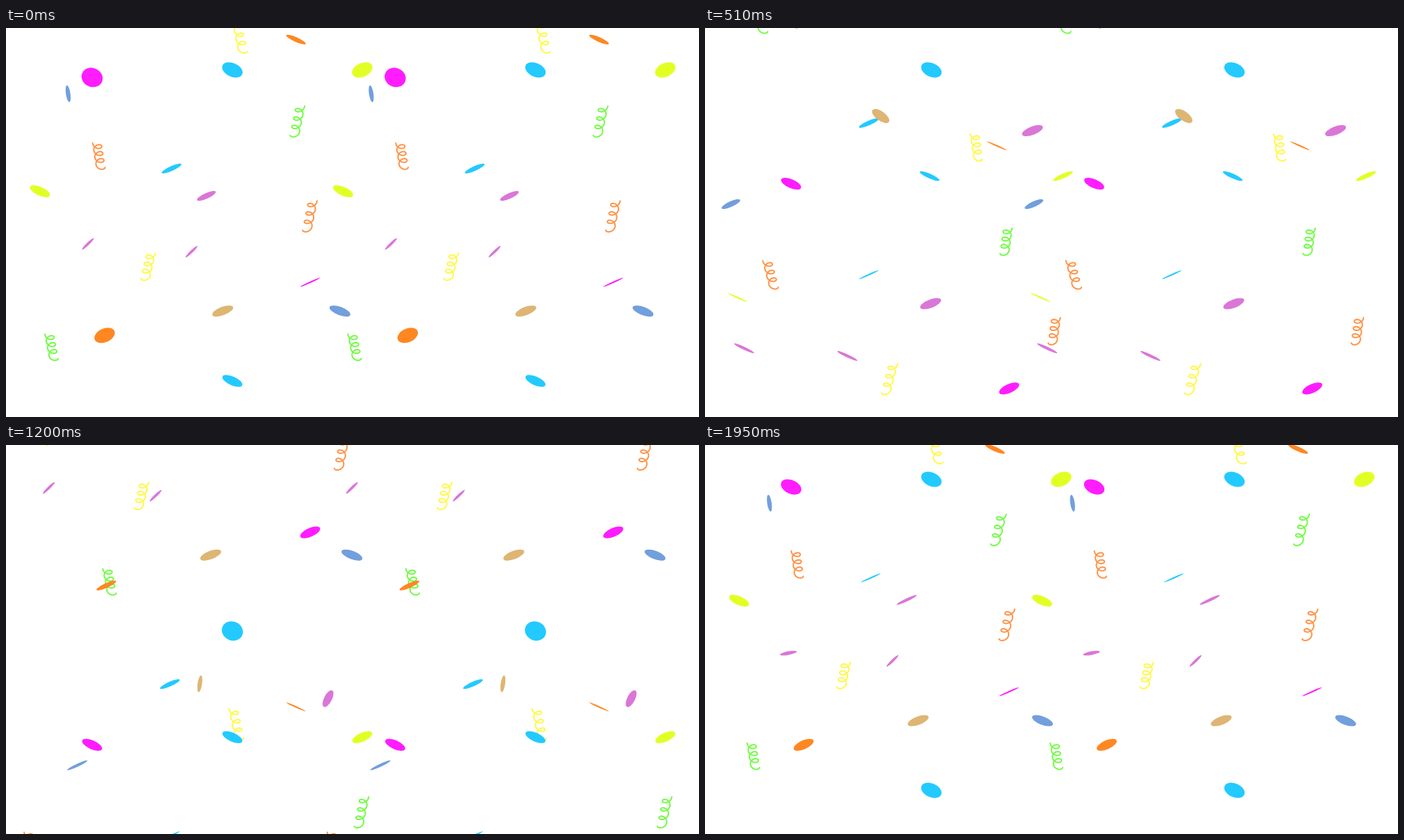
An HTML page with a canvas that plays this animation: 998x561 px, repeating every 1.98 s.

```html
<!DOCTYPE html>
<html lang="en">
<head>
<meta charset="utf-8">
<title>Confetti</title>
<style>
html, body { margin: 0; width: 100%; height: 100%; overflow: hidden; background: #fff; }
canvas { display: block; }
</style>
</head>
<body>
<canvas id="stage" width="998" height="561"></canvas>
<script>
const ctx = document.getElementById('stage').getContext('2d');
const LOOP = 1980, TICK = 30, STEP = 36, STEPS = 55, TILE = 436.5;

const MAGENTA = '#ff1cff', CYAN = '#22caff', LEMON = '#e2ff24', ORANGE = '#ff8722';
const BLUE = '#729fdd', TAN = '#deb573', PLUM = '#da76d8';
const COIL_YELLOW = '#fff84a', COIL_GREEN = '#74fb48', COIL_ORANGE = '#ff9448';

// lane x, age at the start, colour, direction (-1 = mirrored)
const coils = [
  [342, 0, COIL_YELLOW, -1], [463, 11, COIL_GREEN, 1], [84, 15, COIL_ORANGE, -1],
  [478, 22, COIL_ORANGE, 1], [220, 28, COIL_YELLOW, 1], [99, 38, COIL_GREEN, -1]
];
const discs = [
  [124, 6, MAGENTA, 1], [438, 33, MAGENTA, -1], [326, 5, CYAN, 1], [236, 18, CYAN, -1],
  [326, 46, CYAN, 1], [236, 53, CYAN, -1], [513, 5, LEMON, -1], [49, 21, LEMON, 1],
  [142, 40, ORANGE, -1], [420, 1, ORANGE, 1]
];
const flakes = [
  [75, 8, BLUE, -1], [486, 36, BLUE, 1], [307, 36, TAN, -1], [255, 52, TAN, 1],
  [325, 21, PLUM, -1], [84, 27, PLUM, 1], [236, 28, PLUM, 1], [479, 54, PLUM, -1]
];

const mod = (n, size) => (n % size + size) % size;
const wave = (t, peak, period) => Math.cos(2 * Math.PI * (t - peak) / period);

// age wrapped into a range of STEPS that begins at low
const wrap = (age, low) => mod(age - low, STEPS) + low;

function place(x, y, dir, deg, draw) {
  ctx.save();
  ctx.translate(x, y);
  ctx.scale(dir, 1);
  ctx.rotate(deg * Math.PI / 180);
  ctx.beginPath();
  draw();
  ctx.restore();
}

function oval(x, y, dir, deg, a, b, color) {
  place(x, y, dir, deg, () => {
    ctx.ellipse(0, 0, a, b, 0, 0, 2 * Math.PI);
    ctx.fillStyle = color;
    ctx.fill();
  });
}

function drawCoil(x, age, color, dir) {
  const r = wrap(age, -4);
  const cx = x + dir * 50 * wave(r, 46, 60);
  const entry = Math.max(0, 12 - 2.4 * r);
  const cy = 12 * r + 3.5 + 3.5 * wave(r, 26, 44) + entry;
  const len = 39 + 4 * wave(r, 10, 11);
  const lean = 8 + 3 * wave(r, 8.5, 11);
  place(cx, cy, dir, 0, () => {
    for (let i = 0; i <= 96; i++) {
      const u = i / 96, a = u * 7 * Math.PI;
      ctx.lineTo((0.5 - u) * lean + 6.2 * Math.cos(a), (u - 0.5) * len + 5 * Math.sin(a));
    }
    ctx.strokeStyle = color;
    ctx.lineWidth = 2;
    ctx.lineJoin = ctx.lineCap = 'round';
    ctx.stroke();
  });
}

// A disc flips once in nine poses, each held for two steps.
function drawDisc(x, age, color, dir) {
  const k = wrap(age, -1);
  const turn = mod(Math.floor(k / 2) + 1, 9) - 4;
  const b = 1.1 + 12.5 * Math.pow(1 - Math.abs(turn) / 4, 1.25);
  const shift = turn < -2 ? -2.5 : 0;
  oval(x + dir * shift, 5.7 + 10.94 * k, dir, 24, 15.5, b, color);
}

// A flake tumbles half a turn in eleven poses, each held for two steps.
function drawFlake(x, age, color, dir) {
  const m = wrap(age, 0);
  const pose = mod(Math.floor((m - 1) / 2), 11);
  const deg = -25 - 180 * pose / 11 + 38 * wave(pose, -0.1, 11);
  const a = 14.3 + 2.5 * wave(pose, 7.5, 11);
  const b = Math.max(1.9, Math.abs(1.2 + 5.5 * wave(pose, 5.1, 11)));
  const sway = 38 * wave(m, 23.5, 46) + 20 * Math.exp(-m / 6);
  const bob = 4.5 * wave(mod(m + 1, 22), 4.6, 37);
  oval(x + dir * sway, 11.34 * m + 0.8 + bob, dir, deg, a, b, color);
}

function render(n) {
  ctx.fillStyle = '#fff';
  ctx.fillRect(0, 0, 998, 561);
  for (const [list, draw] of [[coils, drawCoil], [discs, drawDisc], [flakes, drawFlake]]) {
    for (const [x, age, color, dir] of list) {
      draw(x, age + n, color, dir);
      draw(x + TILE, age + n, color, dir);
    }
  }
}

const start = performance.now();
function loop() {
  const t = (performance.now() - start) % LOOP;
  render(Math.floor(Math.floor(t / TICK) * TICK / STEP));
  requestAnimationFrame(loop);
}
loop();
</script>
</body>
</html>
```
